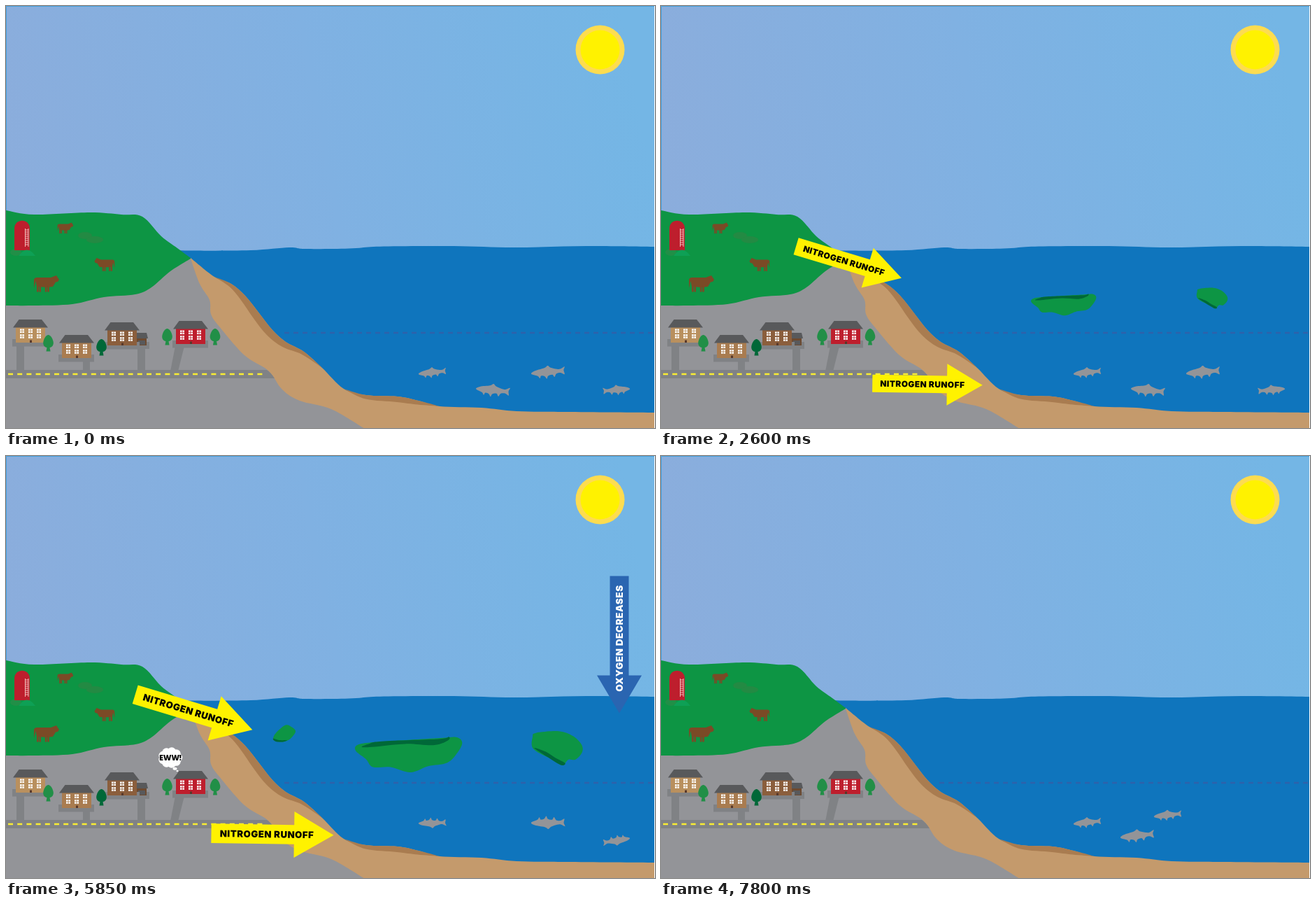
These frames come from a looping animation (928 by 603 pixels, 8450 ms). An HTML page:

```html
<!DOCTYPE html>
<html lang="en">
<head>
<meta charset="utf-8">
<title>Nitrogen runoff</title>
<style>
html, body { margin: 0; width: 100%; height: 100%; overflow: hidden; background: #fff; }
svg { display: block; width: 928px; height: 603px; }
text { font-family: Inter, "Liberation Sans", sans-serif; font-weight: 900; text-anchor: middle; letter-spacing: .5px; }
.speech { font-family: "Open Sans", "Liberation Sans", sans-serif; font-weight: 800; font-stretch: 75%; letter-spacing: 0; }
</style>
</head>
<body>
<svg id="stage" viewBox="0 0 928 603" xmlns="http://www.w3.org/2000/svg"></svg>
<script>
const ASPHALT = '#808285', SLATE = '#58595b', GREY = '#939498';
const GREEN = '#0d9544', LEAF = '#218f47', DARK = '#006838';
const SAND = '#c49a6c', WET = '#a97c50', WATER = '#0f75bd', RED = '#be1e2d', COW = '#7b4a26';

const pairs = s => s.split(' ').map(p => p.split(',').map(Number));

// Smooth line through points; start 'L' continues an open path
function curve(p, closed = false, start = 'M') {
  const n = p.length;
  const at = i => closed ? p[(i + n) % n] : p[Math.max(0, Math.min(n - 1, i))];
  let d = start + p[0];
  for (let i = 0; i < (closed ? n : n - 1); i++) {
    const [a, b, c, e] = [at(i - 1), at(i), at(i + 1), at(i + 2)];
    const c1 = b.map((v, k) => (v + (c[k] - a[k]) / 6).toFixed(1));
    const c2 = c.map((v, k) => (v - (e[k] - b[k]) / 6).toFixed(1));
    d += `C${c1} ${c2} ${c}`;
  }
  return d + (closed ? 'Z' : '');
}

const path = (d, fill) => `<path d="${d}" fill="${fill}"/>`;
const line = (d, stroke, width, extra = '') =>
  `<path d="${d}" fill="none" stroke="${stroke}" stroke-width="${width}" ${extra}/>`;
const dashes = (x1, x2, y, color, pattern) => line(`M${x1} ${y}H${x2}`, color, 2.4, `stroke-dasharray="${pattern}"`);
const blob = (s, fill) => path(curve(pairs(s), true), fill);
const poly = (s, fill) => `<polygon points="${s}" fill="${fill}"/>`;
const rect = (x, y, w, h, fill) => `<rect x="${x}" y="${y}" width="${w}" height="${h}" fill="${fill}"/>`;
const oval = (x, y, rx, ry, fill) => `<ellipse cx="${x}" cy="${y}" rx="${rx}" ry="${ry}" fill="${fill}"/>`;
const group = (move, body) => `<g transform="${move}">${body}</g>`;
const put = (x, y, size, body, turn = 0) =>
  group(`translate(${x} ${y}) rotate(${turn}) scale(${size})`, body);
const repeat = (n, f) => Array.from({ length: n }, (_, i) => f(i)).join('');

// Crescent that hangs below a run of points, deepest in the middle
function crescent(top, depth) {
  const last = top.length - 1;
  const under = top.slice(1, -1).map(([x, y], i) => {
    const dx = top[i + 2][0] - top[i][0], dy = top[i + 2][1] - top[i][1];
    const k = depth * Math.sin(Math.PI * (i + 1) / last) / Math.hypot(dx, dy);
    return [x - dy * k, y + dx * k];
  });
  return path(curve(top) + curve([top[last], ...under.reverse(), top[0]], false, 'L') + 'Z', WET);
}

function house(x, y, color) {
  const pane = i => {
    const wx = 6 + 12 * (i % 3), wy = 13.5 + (i > 2 ? 7.7 : 0);
    return rect(wx, wy, 6, 5.6, '#fff') + line(`M${wx + 3} ${wy}v5.6M${wx} ${wy + 2.8}h6`, color, .8);
  };
  return put(x, y, 1, rect(-5, 28, 51, 10.5, ASPHALT) + rect(0, 10, 42, 23, color) +
    poly('-4,11.5 4.5,0 37,0 46,11.5', SLATE) + repeat(6, pane) + rect(20, 29.5, 3, 3.5, '#58382a'));
}

const tree = (x, y, color) => put(x, y, 1,
  poly('-1.5,5 1.5,5 3,13.5 -3,13.5', color) + blob('0,-10 5,-6 7.3,2 4,7.5 -4,7.5 -7.3,2 -5,-6', color));

const cow = (x, y, sx, sy) => group(`translate(${x} ${y}) scale(${sx} ${sy})`,
  poly('1,5 4,3 25,3 33,0 37,6 35,9 32,9.5 28,16 20,17 5,16 3.5,8 1,18', COW) +
  repeat(4, i => rect(5 + 3.4 * i + (i > 1 ? 5 : 0), 14, 2.6, 9.5, COW)));

const fish = ([x, y, sx, sy, tilt]) => group(`translate(${x} ${y}) rotate(${tilt}) scale(${sx} ${sy})`, blob(
  '-24,1 -19,-3 -5,-6.5 0,-9.5 4,-6.5 13,-4 18,-4 24,-7 22.5,-2 23.5,4 18,1.5 12,2.5 ' +
  '9,7 6,3.5 0,5 -2,9 -5,5.5 -10,4.5 -12,8 -15,4.5', GREY));

const arrow = (len, neck, half, head, fill) => {
  const l = len / 2, n = neck - l;
  return poly(`${-l},${-half} ${n},${-half} ${n},${-head} ${l},0 ${n},${head} ${n},${half} ${-l},${half}`, fill);
};

const runoff = arrow(175, 118.5, 13.8, 33, '#fff200') +
  '<text x="-8" y="4.8" font-size="13.2">NITROGEN RUNOFF</text>';

const oxygen = group('rotate(90)', arrow(196, 142, 13.5, 32, '#2a65b1')) +
  '<text transform="translate(4.9 -9) rotate(-90)" font-size="13.6" fill="#fff">OXYGEN DECREASES</text>';

const bubble = oval(0, 0, 14, 11, '#fff') + repeat(9, i => {
  const a = i * Math.PI / 4.5;
  return oval(11 * Math.cos(a), 8.5 * Math.sin(a), 6.3, 6.3, '#fff');
}) + oval(6.5, 15.8, 3, 2, '#fff') + oval(10, 19, 1.5, 1.2, '#fff') +
  '<text class="speech" y="4.2" font-size="11">EWW!</text>';

const shore = pairs('264,360 298,387 322,397 342,414 362,439 381,463 400,480 426,494 452,517 483,547 ' +
  '515,556 560,558 590,564 620,572 680,574 730,579 800,580 928,581');
const bank = pairs('264,361 277,397 291,420 293,440 305,458 341,499 375,521 395,548 420,564 465,576 513,604');
const sea = pairs('230,348 260,349.5 350,349 405,345 428,347 490,346.5 540,343.5 640,343 726,345 830,343 928,344');
const hill = pairs('0,292 40,298 120,295 165,298 195,301 222,329 245,346 264,360');
const foot = pairs('264,361 235,379 208,402 185,412 140,416 95,426 40,428 0,428');

const farm =
  oval(14, 352, 8, 5, LEAF) + path('M12 349V318C12 303 34 303 34 318V349Z', RED) +
  line('M27.5 318v26M32 318v26' + repeat(8, i => `M27.5 ${320 + 3 * i}h4.5`), '#f3c9c4', .9) +
  path('M18 357Q30 340 42 357Z', '#0ea055') + oval(113, 328, 10, 5, '#238a43') + oval(127, 334, 12, 5, '#238a43') +
  cow(73, 309.5, .63, .66) + cow(156, 360, -.8, .8) + cow(39, 385, 1, 1);

const town =
  rect(15, 484, 11, 38, ASPHALT) + rect(110, 504, 10, 18, ASPHALT) + rect(188, 487, 11, 35, ASPHALT) +
  poly('242,486 255,486 246,522 235,522', ASPHALT) + path('M0 520H373Q379 524 384 532H0Z', ASPHALT) +
  dashes(3, 372, 526, '#f9ed32', '7 6.2') +
  house(14, 448, '#b9905e') + house(80, 470, WET) +
  rect(186, 480, 19, 10, ASPHALT) + rect(187, 474, 14, 11, '#6d4a30') +
  poly('184,467 201,467 203,475 184,475', SLATE) + rect(189, 478, 10, 6, SLATE) +
  house(145, 452, '#8b5e3c') + house(243, 450, RED) +
  tree(60.5, 480, LEAF) + tree(136.5, 486, DARK) + tree(230.5, 471, LEAF) + tree(299, 471, LEAF);

const scenery = `
<defs><linearGradient id="sky" gradientUnits="userSpaceOnUse" x1="0" y1="230" x2="890" y2="60">
<stop offset="0" stop-color="#8baddc"/><stop offset=".5" stop-color="#80b1e2"/><stop offset="1" stop-color="#74b6e5"/>
</linearGradient></defs>` +
  rect(0, 0, 928, 603, 'url(#sky)') + line('M.5 603V.5H928', '#459fda', 1) +
  oval(849.5, 62.5, 35, 35, '#fddc50') + oval(849.5, 62.5, 28, 28, '#fff200') +
  path(curve(sea) + 'V603H230Z', WATER) + dashes(398, 928, 467, '#2d62ab', '7 6') +
  path(curve(shore) + 'V604H264Z', SAND) +
  crescent(shore.slice(1, 9), 11) + crescent(shore.slice(9, 14), 8) +
  path(curve(bank) + 'H0V361Z', GREY) +
  path(curve(hill) + curve(foot, false, 'L') + 'Z', GREEN) + farm + town;

const patches = [
  { x: 576, y: 427, drift: 9, from: 3, art:
    blob('-61,-5 -57,-12 -31,-15 39,-19.5 55,-20 61,-14 56,-3 44,9 22,13 2,20 -21,14 -41,14 -49,5', GREEN) +
    blob('-54,-9 -46,-12.5 -31,-15.5 34,-18 46,-20.5 44,-16 28,-11 -4,-12.5 -42,-9', DARK) },
  { x: 788, y: 417.5, drift: -13, from: 4, art:
    blob('-28,-13 -24,-17.5 2,-19.5 18,-14 28,-4 28.5,5 21,13 13,13 6,19.5 -5,13 -27,1', GREEN) +
    blob('-26,0 -13,4 -2,11 9,17 6,19.5 -4,14.5', DARK) },
  { x: 398, y: 396.5, drift: 0, from: 9, art: put(0, 0, .8,
    blob('-20,9 -15,-1 2,-15 14,-11 20,-3 10,10 -3,15 -16,13', GREEN) +
    blob('-20,9 -8,12 5,12 -3,15 -16,14', DARK)) }
];

// x, y, scale x, scale y, tilt
const school = [[609.5, 524, .82, .82, -4], [696, 549.5, 1, 1, 8], [775, 523.5, 1, 1, -3], [873, 549, -.8, .8, -7]];
const dead = school.filter((_, i) => i !== 1).map(([x, y, sx, sy, tilt]) => [x, y, sx, -sy, tilt]);
const back = [school[0], [681, 543, 1, 1, -4], [724.5, 513.5, .82, .82, -4]];

const STEP = 650, STEPS = 13, PEAK = 9, LAST = STEPS - 1;

function draw(i) {
  let out = (i === LAST ? back : i > 6 ? dead : school).map(fish).join('');
  if (i === 0 || i === LAST) return out;

  // Patches bloom, hold, swell to the peak and shrink again
  const bloom = Math.min(.24 * i - .2, 1 + .125 * Math.max(0, i - 7), 1.25 - .125 * (i - PEAK));
  for (const p of patches) {
    const ends = p.from === PEAK ? PEAK : LAST;
    if (i < p.from || i > ends) continue;
    out += put(p.x + (i > PEAK ? p.drift : 0), p.y, p.from === PEAK ? 1 : bloom, p.art);
  }

  const flow = Math.min(1, .5 + .1 * i, 1 - .1 * (i - PEAK));
  out += put(268.5, 366, flow, runoff, 16.8) + put(381, 540.5, flow, runoff, .9);
  if (i > 5 && i <= PEAK) out += put(877, 269.5, Math.min(1, .8 + .2 * (i - 6)), oxygen);
  if (i === PEAK) out += put(235, 431, 1, bubble);
  return out;
}

const stage = document.getElementById('stage');
stage.innerHTML = scenery + '<g id="scene"></g>' + rect(927, 0, 1, 603, '#fff');
const scene = document.getElementById('scene');
const begin = performance.now();
let shown = -1;

function tick() {
  const i = Math.floor((performance.now() - begin) / STEP) % STEPS;
  if (i !== shown) {
    shown = i;
    scene.innerHTML = draw(i);
  }
  requestAnimationFrame(tick);
}
tick();
</script>
</body>
</html>
```
